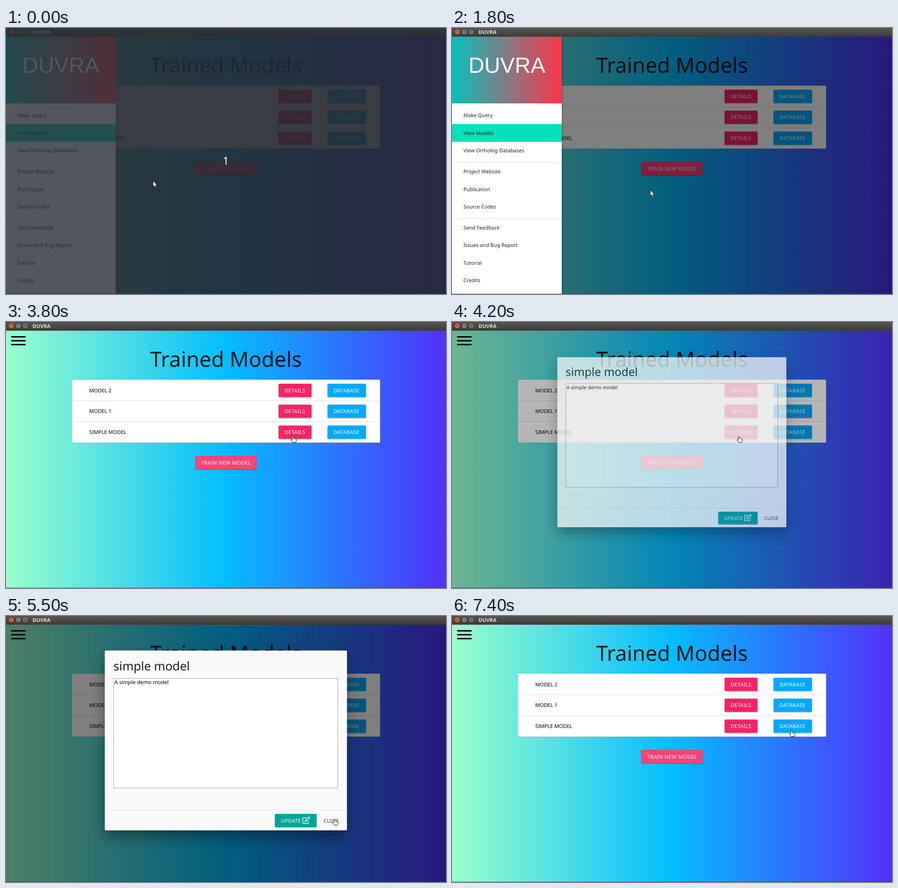
Recreate the animation shown at these times as an HTML page. Size 962 by 582 pixels, loop 8 s.

```html
<!DOCTYPE html>
<html lang="en">
<head>
<meta charset="utf-8">
<title>Trained Models</title>
<style>
  html, body { margin: 0; width: 100%; height: 100%; overflow: hidden; background: #3c3b37; }
  svg { display: block; width: 962px; height: 582px; }
  text { font-family: "Noto Sans", "Open Sans", sans-serif; font-size: 11.2px; text-rendering: geometricPrecision; white-space: pre; }
  .label { fill: #fff; letter-spacing: .4px; }
  .raised { filter: drop-shadow(0 1.5px 1.2px rgba(0,0,0,.35)); }
  .menu text { font-weight: 500; fill: rgba(0,0,0,.87); }
  .menu .brand { font: 48px "Liberation Sans", Arial, sans-serif; fill: #fff; }
  .drawer { filter: drop-shadow(1px 1px 2px rgba(0,0,0,.3)); }
  .modal { filter: drop-shadow(0 14px 15px rgba(0,0,0,.38)); }
</style>
</head>
<body>
<svg id="stage" viewBox="0 0 962 582"></svg>
<script>
const LOOP = 8000, STEP = 100;
const BRAND = "DUVRA";

const rect = (x, y, w, h, fill, extra = "") =>
  `<rect x="${x}" y="${y}" width="${w}" height="${h}" fill="${fill}" ${extra}/>`;
const text = (x, y, str, extra = "") => `<text x="${x}" y="${y}" ${extra}>${str}</text>`;
const button = (x, y, w, fill, label) =>
  rect(x, y, w, 29, fill, 'rx="2" class="raised"') + text(x + 13, y + 18.5, label, 'class="label"');
const gradient = (id, colors, vertical) =>
  `<linearGradient id="${id}" ${vertical ? 'x2="0" y2="1"' : ""}>` +
  colors.map((c, i) => `<stop offset="${i / (colors.length - 1)}" stop-color="${c}"/>`).join("") +
  "</linearGradient>";

const modelRow = (name, i) => {
  const y = 135 + i * 45.8;
  return (i ? rect(144, y - 9, 674, 1, "#dcdcdc") : "") +
    text(182, y + 18.5, name) +
    button(596, y, 72, "#f62465", "DETAILS") +
    button(703, y, 84, "#03a9fc", "DATABASE");
};

const menuGroups = [
  [191, ["Make Query", "View Models", "View Ortholog Databases"]],
  [314, ["Project Website", "Publication", "Source Codes"]],
  [436.7, ["Send Feedback", "Issues and Bug Report", "Tutorial", "Credits"]],
];
const menuItems = menuGroups.map(([top, items]) =>
  items.map((item, i) => text(25, top + 4 + i * 38.5, item)).join("")).join("");

const page = `
  ${rect(0, 19, 962, 563, "url(#sky)")}
  ${[31, 39.5, 48].map(y => rect(11, y, 32, 3, "#000", 'rx="1.2"')).join("")}
  ${text(481, 97.5, "Trained Models", 'text-anchor="middle" style="font-size:46px" fill="#000" fill-opacity=".87"')}
  ${rect(144, 126, 674, 138, "#fff", 'rx="2" stroke="#000" stroke-opacity=".12"')}
  ${["MODEL 2", "MODEL 1", "SIMPLE MODEL"].map(modelRow).join("")}
  <circle id="ripple" cx="628" cy="250" fill="#fff" fill-opacity=".22" clip-path="url(#rippleClip)"/>
  ${button(414, 293, 134, "#fa4379", "TRAIN NEW MODEL")}`;

const drawer = `
  <g id="drawer" class="menu drawer">
    ${rect(0, 19, 240, 563, "#fff")}
    ${rect(0, 19, 240, 146, "url(#header)")}
    ${text(120, 97.5, BRAND, 'class="brand" text-anchor="middle"')}
    ${rect(0, 210, 240, 39, "#03e2b8")}
    ${rect(0, 294, 240, 1, "#dedede")}
    ${rect(0, 416.5, 240, 1, "#dedede")}
    ${menuItems}
  </g>`;

const modal = `
  <g id="modal" class="modal">
    ${rect(216, 75.5, 529.5, 393.5, "#fafafa", 'rx="2"')}
    ${text(235, 119, "simple model", 'style="font-size:26.3px" fill="#1f1f1f"')}
    ${rect(235.5, 136.5, 490, 240, "#fff", 'stroke="#a4a4a4"')}
    ${text(237, 149, "A simple demo model", 'style="font-size:11.6px"')}
    ${rect(216, 424, 529.5, 1, "#e2e2e2")}
    ${button(588, 433, 91, "#00a499", "UPDATE")}
    <g fill="none" stroke="#fff" stroke-width="1.4" stroke-linejoin="round">
      <path d="M657 441.5h-8v12.5h12.5v-5.5"/>
      <path d="M653.5 450l.8-3.3 7.5-7.2 2.7 2.5-7.6 7.3z"/>
    </g>
    ${text(694.5, 451.5, "CLOSE", 'style="font-size:10.9px" fill="#343434"')}
  </g>`;

const windowButton = (x, fill, glyph) =>
  `<circle cx="${x}" cy="8.3" r="5.8" fill="${fill}" stroke="#32312d"/>
   <path d="${glyph}" transform="translate(${x} 8.3)" fill="none" stroke="#35332f"/>`;

const titleBar = `
  ${rect(0, 0, 962, 19, "url(#bar)")}
  ${windowButton(11.5, "#ee6443", "M-2-2L2 2M2-2L-2 2")}
  ${windowButton(27, "#85847b", "M-2.5 0h5")}
  ${windowButton(42, "#85847b", "M-2-2h4v4h-4z")}
  ${text(58, 12.5, BRAND, 'style="font-weight:700;font-size:11.2px" fill="#e2ded5"')}
  ${rect(0, 581, 962, 1, "#3c3b37", 'opacity=".6"')}`;

const cursors = `
  <g id="cursor" fill="#fff" stroke="#111" stroke-linejoin="round">
    <path id="arrow" d="M.5.5v13l3-2.8 2.1 4.6 2.2-1-2-4.4h3.7z"/>
    <path id="hand" d="M-1.3 8V1.3Q-1.3.3 0 .3t1.3 1v3.5q2-.6 2.4.5 2-.5 2.3.5 1.8-.2 1.8 1.2v3.2l-1.3 3.3h-6.7l-3.5-4.3q-.8-1.2.2-1.7.9-.3 2.2 1z"/>
    <path id="beam" fill="none" d="M-3.5-7.5h2.5q1 0 1 1v13q0 1-1 1h-2.5M3.5-7.5H1q-1 0-1 1v13q0 1 1 1h2.5"/>
  </g>`;

document.getElementById("stage").innerHTML = `
  <defs>
    ${gradient("sky", ["#9affcb", "#04bdff", "#5131fa"])}
    ${gradient("header", ["#0abfbc", "#fc354c"])}
    ${gradient("bar", ["#57564f", "#3c3b37"], true)}
    <clipPath id="rippleClip">${rect(596, 226.6, 72, 29, "#000", 'rx="2"')}</clipPath>
  </defs>
  ${page}
  ${rect(0, 19, 962, 563, "#000", 'id="shade"')}
  ${drawer}${modal}${titleBar}
  ${rect(0, 0, 962, 582, "#282c34", 'id="dim"')}
  ${text(480.5, 299, "1", 'id="count" text-anchor="middle" style="font-size:24px" fill="#fff"')}
  ${cursors}`;

const el = Object.fromEntries([...document.querySelectorAll("#stage [id]")].map(n => [n.id, n]));
const progress = (t, start, duration) => Math.min(1, Math.max(0, (t - start) / duration));
const easeOut = (p, power) => 1 - (1 - p) ** power;
const show = (node, visible) => node.setAttribute("visibility", visible ? "visible" : "hidden");

// Pointer track: time, x, y
const track = [
  [0, 321, 334], [800, 321, 334], [1400, 433, 354], [2200, 433, 354], [2400, 467, 364],
  [3700, 467, 364], [3800, 627, 250], [4600, 627, 250], [5500, 718, 444], [6200, 718, 444],
  [6300, 720, 422], [6700, 720, 422], [6800, 716, 311], [7300, 716, 311], [7400, 742, 250], [LOOP, 742, 250],
];

function pointerAt(t) {
  const i = track.findIndex(key => key[0] > t);
  const [t0, x0, y0] = track[i - 1], [t1, x1, y1] = track[i];
  const p = (t - t0) / (t1 - t0);
  return [x0 + (x1 - x0) * p, y0 + (y1 - y0) * p];
}

function pointerShape(t) {
  if (t >= 4700 && t < 5200) return "beam";
  const overButton = (t >= 3800 && t < 4700) || (t >= 5500 && t < 6300) || t >= 7400;
  return overButton ? "hand" : "arrow";
}

function draw(t) {
  el.dim.setAttribute("opacity", 0.8 * (1 - progress(t, 200, 300)));
  show(el.count, t < 300);

  const closed = easeOut(progress(t, 1868, 200), 2);
  el.drawer.setAttribute("transform", `translate(${-240 * closed} 0)`);
  show(el.drawer, closed < 1);

  const modalOpen = t < 6300 ? progress(t, 4112, 250) : 0;
  const grow = easeOut(modalOpen, 3), scale = 0.8 + 0.2 * grow;
  el.modal.setAttribute("transform",
    `translate(480.75 ${272.2 - 33.7 * (1 - grow)}) scale(${scale}) translate(-480.75 -272.2)`);
  el.modal.setAttribute("opacity", grow);
  show(el.modal, modalOpen > 0);
  el.shade.setAttribute("opacity", 0.5 * (1 - closed + easeOut(modalOpen, 2)));

  el.ripple.setAttribute("r", t >= 4000 && t < 4600 ? (t - 3950) * 0.16 : 0);

  el.cursor.setAttribute("transform", `translate(${pointerAt(t).join(" ")})`);
  for (const shape of ["arrow", "hand", "beam"]) show(el[shape], shape === pointerShape(t));
}

function tick() {
  const t = performance.now() % LOOP;
  draw(Math.floor(t / STEP) * STEP);
  requestAnimationFrame(tick);
}
tick();
</script>
</body>
</html>
```
